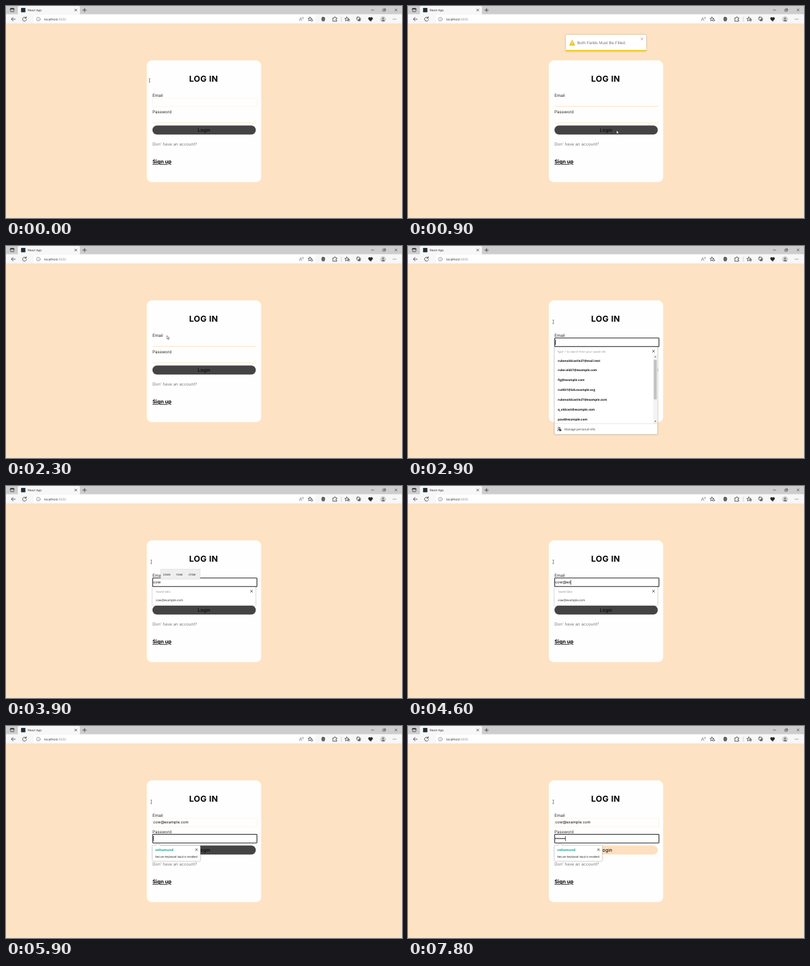
These frames come from a looping animation (600 by 322 pixels, 8 s). An HTML page:

```html
<!DOCTYPE html>
<html lang="en">
<head>
<meta charset="utf-8">
<title>Login form</title>
<style>
  html, body { margin: 0; width: 100%; height: 100%; overflow: hidden; background: #fde2c3; }
  svg { display: block; width: 600px; height: 322px; }
  text { font-family: Inter, sans-serif; text-rendering: geometricPrecision; white-space: pre; }
  .ui { font-family: "Open Sans", sans-serif; }
  .arial { font-family: "Liberation Sans", sans-serif; }
  .line { fill: none; stroke: #333; stroke-width: .8; stroke-linecap: round; stroke-linejoin: round; }
  .soft { filter: drop-shadow(0 .4px 1.2px rgba(0, 0, 0, .28)); }
</style>
</head>
<body>
<svg viewBox="0 0 600 322" xmlns="http://www.w3.org/2000/svg">
  <rect width="600" height="322" fill="#fde2c3"/>

  <g id="card">
    <rect x="213.4" y="82.6" width="173.2" height="184.9" rx="8" fill="#fffefe"/>
    <text x="277.4" y="114.8" font-size="12.5" font-weight="700" letter-spacing=".39">LOG IN</text>
    <text x="222" y="138.1" font-size="6.25" fill="#222">Email</text>
    <text x="222" y="162.9" font-size="6.25" fill="#222">Password</text>
    <rect id="emailLine" x="222" y="152.3" width="158" height=".7" fill="#fbd9b2"/>
    <rect id="passLine" x="222" y="177.2" width="158" height=".7" fill="#fbe3c9"/>
    <rect id="emailBox" x="222" y="140" width="158.6" height="13" fill="none" stroke="#fdf0df" stroke-width=".8"/>
    <rect id="button" x="221.9" y="181.4" width="156.6" height="13.9" rx="6.9"/>
    <text x="300" y="191.2" font-size="7.3" text-anchor="middle">Login</text>
    <text x="222" y="211.7" font-size="6.25" fill="#777">Don' have an account?</text>
    <text x="222" y="239" font-size="7.8" font-weight="700" text-decoration="underline">Sign up</text>
  </g>

  <rect id="ring" x="222.2" width="158" height="13.2" rx=".9" fill="#fff" stroke="#222" stroke-width="1.1"/>
  <text id="email" x="223" y="148.4" font-size="5.8" fill="#111"></text>
  <g id="dots" fill="#111"></g>
  <rect id="caret" width=".7" height="7.6" fill="#111"/>

  <g id="fullList">
    <rect class="soft" x="222" y="153.4" width="156" height="132.6" fill="#fff" stroke="#c5bdb8" stroke-width=".4"/>
    <text class="ui" x="226" y="161.5" font-size="4.15" fill="#888">Type '/' to search from your saved info</text>
    <g id="items"></g>
    <rect x="371.5" y="165" width="6.3" height="104.5" fill="#f3f3f3"/>
    <rect x="372.4" y="173" width="4.5" height="60" fill="#c3c3c3"/>
    <path d="M373.3 169l1.5-1.8 1.5 1.8zM373.3 265.6l1.5 1.8 1.5-1.8z" fill="#666"/>
    <path d="M222 269.8h156" stroke="#ccc" stroke-width=".5"/>
    <g class="line" stroke-width=".9">
      <circle cx="228.8" cy="276.7" r="1.5"/><path d="M226.6 280.6q0-2 2.2-2h.6"/>
      <rect x="229.7" y="278.7" width="2.2" height="2" fill="#333"/>
    </g>
    <text class="ui" x="237" y="279.7" font-size="4.6" fill="#333">Manage personal info</text>
  </g>

  <g id="shortList">
    <rect class="soft" x="222" y="153.4" width="156" height="28" fill="#fff" stroke="#ddd" stroke-width=".3"/>
    <text class="ui" x="227.5" y="161.5" font-size="4.2" fill="#888">Saved data</text>
    <text class="ui" x="227" y="175" font-size="4.6" fill="#222">cow@example.com</text>
  </g>
  <path id="listClose" class="line" d="M370.4 158.2l3.2 3.2m0-3.2l-3.2 3.2"/>

  <g id="hints">
    <rect x="234.6" y="126.2" width="59.4" height="15.4" fill="#eeeeee" stroke="#d2d2d2" stroke-width=".5"/>
    <g font-size="4.9" fill="#222">
      <text class="ui" x="238" y="136.1">cows</text>
      <text class="ui" x="258" y="136.1">now</text>
      <text class="ui" x="276.5" y="136.1">crow</text>
    </g>
  </g>

  <g id="guard">
    <path class="soft" d="M223 181.6h4.3l2.9-3 2.9 3h60.2q1 0 1 1v21.4q0 1-1 1h-70.3q-1 0-1-1v-21.4q0-1 1-1z" fill="#fff" stroke="#ccc" stroke-width=".4"/>
    <text class="ui" x="226" y="190.2" font-size="5.1" font-weight="700" fill="#17a398">veltomund</text>
    <path class="line" d="M287.2 186.4l2.8 2.8m0-2.8l-2.8 2.8"/>
    <text class="arial" x="226" y="199.6" font-size="4.3" fill="#222">Secure keyboard input is enabled</text>
  </g>

  <g id="toast">
    <rect class="soft" x="239.1" y="36" width="121.8" height="24.9" rx="1.5" fill="#fff"/>
    <path d="M248.8 44.6l3.6 7.2h-7.2z" fill="#f1c40f" stroke="#f1c40f" stroke-width="1.2" stroke-linejoin="round"/>
    <path d="M248.8 46.4v2.9m0 1v1" stroke="#fff" stroke-width="1"/>
    <text class="arial" x="256.2" y="50.6" font-size="6.25" fill="#757575">Both Fields Must Be Filled.</text>
    <path class="line" style="stroke:#999" d="M353 40.6l3.2 3.2m0-3.2l-3.2 3.2"/>
    <rect id="bar" x="239.1" y="59" width="121.8" height="1.9" fill="#f1c40f"/>
  </g>

  <g id="browser">
    <rect width="600" height="13" fill="#cdcdcd"/>
    <rect y="12.4" width="600" height="14.6" fill="#f7f7f7"/>
    <path d="M18 13V2q0-2 2-2h90q2 0 2 2v11z" fill="#f7f7f7"/>
    <rect x="42" y="13.6" width="427" height="12.2" rx="2" fill="#fff"/>
    <path d="M0 26.8h600" stroke="#e4e0dc" stroke-width=".5"/>
    <rect x="22.8" y="2.9" width="6.6" height="6.6" fill="#20303a"/>
    <text class="ui" x="33" y="7.9" font-size="4.5" fill="#222">React App</text>
    <text class="ui" x="58" y="21.8" font-size="4.9" fill="#222">localhost<tspan fill="#888">:3000</tspan></text>
    <g class="line">
      <rect x="6.8" y="3.4" width="5.2" height="5.2" rx=".8"/><path d="M6.8 4.4h5.2" stroke-width="1.5"/>
      <path d="M104.2 4.7l3 3m0-3l-3 3M116.2 6.2h5.6m-2.8-2.8v5.6"/>
      <path d="M14 20H8.2m2.6-2.7L8.2 20l2.6 2.7"/>
      <path d="M30.6 18.3a3 3 0 1 0 .5 2.2m-.3-4.3v2.2h-2.2"/>
      <g style="stroke:#777;stroke-width:.6"><circle cx="49" cy="20" r="2.9"/><path d="M49 19.7v1.7m0-3.1v.1"/></g>
      <g style="stroke:#777;stroke-width:.6">
        <path d="M444.4 22.4l2-5 2 5m-3.3-1.7h2.6m1.3-3.4q.9.8 0 1.7m1.1-2.4q1.4 1.6 0 3.1"/>
      </g>
      <path id="starAdd"/><circle cx="463.3" cy="21.7" r="1.4" fill="#fff" stroke-width=".6"/>
      <rect x="478.8" y="17.2" width="3.8" height="5.6" rx="1" fill="#777"/><path d="M478.2 18.5h5m-5 2h5" style="stroke:#555"/>
      <path d="M495.6 18h1.7q0-1.5 1.1-1.5t1.1 1.5h1.6v1.7q-1.4 0-1.4 1t1.4 1v1.4h-5.5z"/>
      <path d="M508 16.5v7" style="stroke:#bbb;stroke-width:.6"/>
      <path id="star"/><path d="M518.6 20.5h2m-2 1.8h2"/>
      <rect x="531.6" y="16.9" width="4.2" height="4.2" rx=".8"/><path d="M537 18.6v3.2q0 .7-.7.7h-3m1.9-2.5v1.6m-.8-.8h1.6"/>
      <path d="M552.3 23l-2.7-2.8q-1-1.4 0-2.5 1.5-1.2 2.7.4 1.2-1.6 2.7-.4 1 1.1 0 2.5z" fill="#222"/>
      <circle cx="571.3" cy="20" r="4" fill="#d5d5d5" style="stroke:#aaa;stroke-width:.3"/>
      <g fill="#777" stroke="none"><circle cx="571.3" cy="18.8" r="1.4" style="stroke:none"/><path style="stroke:none" d="M568.8 22.6q0-1.8 2.5-1.8t2.5 1.8-5 0z"/></g>
      <path d="M586.8 20h.01m1.99 0h.01m1.99 0h.01" stroke-width="1"/>
      <path d="M553.6 6.2h3.6M571.3 5.2h2.8v2.8h-2.8zM572.3 5V4.2h2.8V7h-.8M589.3 4.4l3.3 3.3m0-3.3l-3.3 3.3" style="stroke-width:.6"/>
    </g>
  </g>

  <path id="arrow" d="M0 0v5.2l1.3-1.1.9 1.9.8-.4-.9-1.8h1.7z" fill="#fff" stroke="#222" stroke-width=".5"/>
  <path id="beam" d="M-1.1-2.8h.8l.3.3.3-.3h.8M0-2.5v5M-1.1 2.8h.8l.3-.3.3.3h.8" fill="none" stroke="#444" stroke-width=".65"/>
</svg>

<script>
const LOOP = 8000, STEP = 100, SCALE = 600 / 1536;
const $ = id => document.getElementById(id);
const show = (id, on) => $(id).setAttribute('visibility', on ? 'visible' : 'hidden');
const set = (id, attrs) => { for (const k in attrs) $(id).setAttribute(k, attrs[k]); };
const make = (tag, attrs, parent) => {
  const el = document.createElementNS('http://www.w3.org/2000/svg', tag);
  for (const k in attrs) el.setAttribute(k, attrs[k]);
  return parent.appendChild(el);
};
const clamp = v => Math.max(0, Math.min(1, v));
const easeOut = p => 1 - (1 - p) ** 3;
const easeBoth = p => p * p * (3 - 2 * p);

// Interpolates rows of [position, ...values]
function track(rows, at, ease) {
  if (at <= rows[0][0]) return rows[0].slice(1);
  for (let i = 1; i < rows.length; i++) {
    const a = rows[i - 1], b = rows[i];
    if (at <= b[0]) {
      const p = ease((at - a[0]) / (b[0] - a[0]));
      return a.slice(1).map((v, k) => v + (b[k + 1] - v) * p);
    }
  }
  return rows[rows.length - 1].slice(1);
}

const EMAIL = 'cow@example.com';
const emailKeys = [3100, 3300, 3400, 4200, 4400, 4600, 4800, 4900, 5000, 5100, 5200, 5400, 5500, 5600, 5700];
const passKeys = [6200, 6500, 6600, 6700, 6800, 6950, 7700];
const EMAIL_FOCUS = 2500, PASS_FOCUS = 5800;
const TOAST_IN = 530, TOAST_OUT = 1800, TOAST_MOVE = 700;

const bounceIn = [[0, -3000], [.6, 25], [.75, -10], [.9, 5], [1, 0]];
const bounceOut = [[0, 0, 1], [.2, -10, 1], [.4, 20, 1], [.45, 20, 1], [1, -2000, 0]];
const pointer = [
  [0, 217.5, 113], [100, 217.5, 113], [400, 316, 189], [900, 316, 189], [1400, 328.3, 32],
  [1700, 354.5, 42], [1900, 354.5, 42], [2400, 231, 147], [2600, 231, 147], [2700, 220.2, 115.3]
];

const contacts = [
  'rubenoldcastle27@mail.test', 'rube-old27@example.com', 'fig@example.com',
  'ru4031@lab.example.org', 'rubenoldcastle27@example.com', 'q_oldcast@example.com', 'paul@example.com'
];
contacts.forEach((name, i) => {
  make('text', { class: 'ui', x: 227, y: 175.5 + i * 14.85, 'font-size': 4.6, 'font-weight': 700, fill: '#111' }, $('items'))
    .textContent = name;
});

const dots = passKeys.map((_, i) => make('circle', { cx: 224 + i * 2.2, cy: 170.8, r: .85 }, $('dots')));

function starPath(cx, cy, r) {
  let d = '';
  for (let i = 0; i < 10; i++) {
    const a = i * Math.PI / 5, q = i % 2 ? r * .48 : r;
    d += (i ? 'L' : 'M') + (cx + q * Math.sin(a)).toFixed(2) + ' ' + (cy - q * Math.cos(a)).toFixed(2);
  }
  return d + 'Z';
}
set('starAdd', { d: starPath(460.6, 20, 3.2) });
set('star', { d: starPath(516.4, 20, 3.2) });

function drawToast(t) {
  const leaving = t >= TOAST_OUT;
  const p = clamp((t - (leaving ? TOAST_OUT : TOAST_IN)) / TOAST_MOVE);
  const [y, alpha = 1] = track(leaving ? bounceOut : bounceIn, p, easeOut);
  show('toast', t >= TOAST_IN && t < TOAST_OUT + TOAST_MOVE);
  set('toast', { transform: `translate(0 ${y * SCALE})`, opacity: alpha });
  // The countdown pauses under the pointer
  const spent = clamp((Math.min(t, 1600) - 1220) / 2000);
  set('bar', { width: 121.8 * (1 - spent) });
}

function drawPointer(t) {
  const [x, y] = track(pointer, t, easeBoth);
  const beam = t < 200 || t >= 2400;
  show('beam', beam);
  show('arrow', !beam);
  set(beam ? 'beam' : 'arrow', { transform: `translate(${x} ${y})` });
}

function drawForm(t) {
  const typed = emailKeys.filter(k => k <= t).length;
  const hidden = passKeys.filter(k => k <= t).length;
  const onEmail = t >= EMAIL_FOCUS && t < PASS_FOCUS, onPass = t >= PASS_FOCUS;
  const full = t >= 2900 && !typed;

  show('emailBox', t < 400 || onPass);
  show('emailLine', t >= 400 && !onPass);
  show('passLine', !onPass);
  show('ring', onEmail || onPass);
  set('ring', { y: onPass ? 164.5 : 139.7 });
  set('button', { fill: hidden ? '#fde0bf' : '#444' });
  $('email').textContent = EMAIL.slice(0, typed);
  dots.forEach((d, i) => d.setAttribute('visibility', i < hidden ? 'visible' : 'hidden'));

  show('fullList', full);
  show('shortList', typed && onEmail);
  show('listClose', onEmail && (full || typed));
  show('hints', t >= 3900 && t < 4200);
  show('guard', onPass);

  const last = onPass ? passKeys[hidden - 1] || PASS_FOCUS : emailKeys[typed - 1] || EMAIL_FOCUS;
  const width = onPass ? hidden * 2.2 : typed && $('email').getComputedTextLength();
  show('caret', (onEmail || onPass) && (t - last) % 1000 < 420);
  set('caret', { x: 223 + width, y: onPass ? 167.1 : 142.6 });
}

function draw(now) {
  const t = Math.floor((now % LOOP) / STEP) * STEP;
  drawForm(t);
  drawToast(t);
  drawPointer(t);
}

const start = performance.now();
function tick() {
  draw(performance.now() - start);
  requestAnimationFrame(tick);
}
tick();
</script>
</body>
</html>
```
